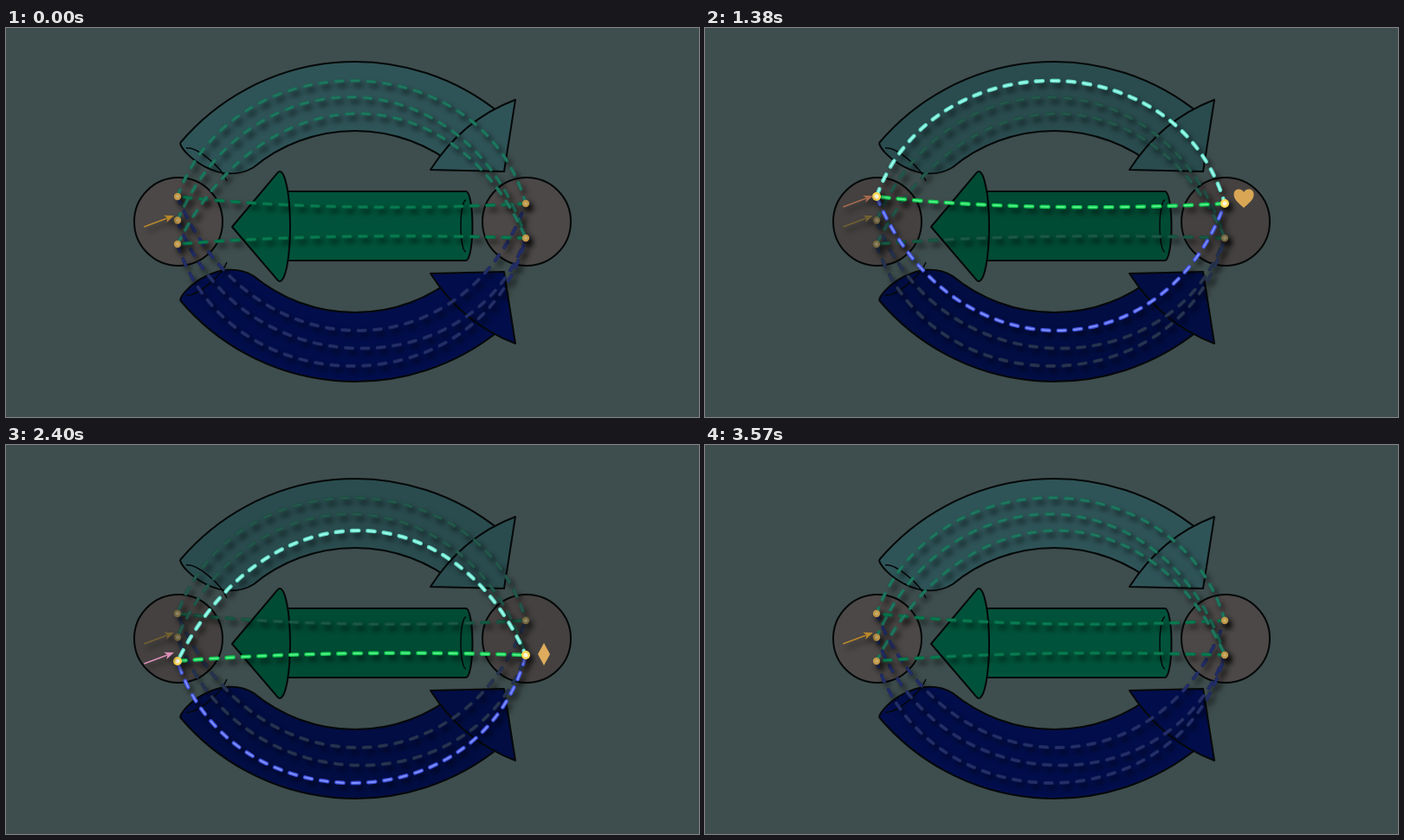
Recreate the animation shown at these times as an HTML page with a canvas. Size 800 by 450 pixels, loop 3600 ms.

```html
<!DOCTYPE html>
<html lang="en">
<head>
<meta charset="utf-8">
<title>Dashed flow diagram</title>
<style>
  html, body { margin: 0; width: 100%; height: 100%; overflow: hidden; background: #3e4d4d; }
  canvas { display: block; width: 800px; height: 450px; }
</style>
</head>
<body>
<canvas id="stage" width="800" height="450"></canvas>
<script>
const ctx = document.getElementById('stage').getContext('2d');
const LOOP = 3600, STEP = 30, FLOW = 450;
const DASH = 8.2, PERIOD = 18.4;
const LEFT = 198, RIGHT = 600;
const TAU = Math.PI * 2;
const INK = '#050808', WHITE = [255, 255, 255], BLACK = [0, 0, 0], MURK = [42, 58, 58];

const hues = {
  teal:  { tube: [47, 84, 88], rest: [31, 122, 98],  lit: [118, 255, 230] },
  green: { tube: [0, 83, 58],  rest: [8, 126, 82],   lit: [18, 235, 92] },
  blue:  { tube: [2, 14, 76],  rest: [36, 48, 108],  lit: [76, 98, 255] },
  dot:   { rest: [190, 150, 70], lit: [255, 218, 84] }
};

const leftY = row => 195 + 27.5 * row;
const rightY = row => row ? 243 : 203;
const clamp = v => Math.max(0, Math.min(1, v));
const mix = (a, b, k) => a.map((v, i) => v + (b[i] - v) * k);
const rgb = (c, alpha = 1) => `rgba(${c.map(Math.round).join(',')},${alpha})`;

// A cubic between the dots of a row whose middle lies at height `peak`.
function link(hue, row, peak, reach) {
  const y1 = leftY(row), y2 = rightY(row), bend = (8 * peak - y1 - y2) / 6;
  const points = [[LEFT, y1], [LEFT + reach, bend], [RIGHT - 0.85 * reach, bend], [RIGHT, y2]];
  return { hue, row, points: hue === 'green' ? points.reverse() : points };
}

const links = [];
for (let row = 0; row < 3; row++) {
  links.push(link('teal', row, 61 + 19 * row, 64 + 18 * row));
  links.push(link('blue', row, 350 + 20.5 * row, 84 - 12 * row));
  if (row !== 1) links.push(link('green', row, 207 + 17 * row, 132));
}

function fadeAt(t, start) {
  return Math.min(clamp((t - start) / 240), clamp((start + 1770 - t) / 270));
}

function shape(fill, trace, width = 2) {
  ctx.beginPath();
  trace();
  if (fill) {
    ctx.fillStyle = fill;
    ctx.fill();
  }
  ctx.strokeStyle = INK;
  ctx.lineWidth = width;
  ctx.stroke();
}

function disc(x, y, r, fill) {
  ctx.fillStyle = fill;
  ctx.beginPath();
  ctx.arc(x, y, r, 0, TAU);
  ctx.fill();
}

function curvedTube(fill) {
  const cx = 403, cy = 303, outer = 264, inner = 184, end = -0.88;
  shape(fill, () => {
    ctx.arc(cx, cy, outer, -2.442, end);
    ctx.arc(cx, cy, inner, end, -2.442 + 0.18, true);
    ctx.bezierCurveTo(248, 184, 203, 146, 201, 133);
  });
  shape(null, () => {
    ctx.moveTo(208, 139);
    ctx.bezierCurveTo(220, 137, 248, 160, 255, 177);
  }, 1.5);
  shape(fill, () => {
    ctx.moveTo(490, 164);
    ctx.quadraticCurveTo(527, 106, 588, 83);
    ctx.lineTo(575, 166);
    ctx.closePath();
  });
}

function straightTube(fill) {
  const cy = 229, tip = 261, base = 316, rim = 12, half = Math.PI / 2;
  const tangent = Math.acos(-rim / (base - tip));
  shape(fill, () => {
    ctx.moveTo(base, cy - 40);
    ctx.ellipse(531, cy, 7.5, 40, 0, -half, half);
    ctx.lineTo(base, cy + 40);
  });
  shape(null, () => ctx.ellipse(531, cy, 6, 30, 0, half, 3 * half), 1.5);
  shape(fill, () => {
    ctx.moveTo(tip, cy + 1);
    ctx.ellipse(base, cy + 0.5, rim, 63.5, 0, -tangent, tangent);
    ctx.closePath();
  });
}

function withShadow(paint) {
  ctx.save();
  ctx.shadowColor = 'rgba(0,0,0,0.65)';
  ctx.shadowBlur = 6;
  ctx.shadowOffsetX = 4;
  ctx.shadowOffsetY = 5;
  paint();
  ctx.restore();
}

function tone(hue, lit, busy) {
  return mix(mix(hue.rest, MURK, busy / 2), hue.lit, lit);
}

function drawLink({ hue, row, points }, t, fades, busy) {
  const lit = fades[row], color = tone(hues[hue], lit, busy);
  const [start, ...rest] = points;
  const stroke = (style, width) => {
    ctx.strokeStyle = style;
    ctx.lineWidth = width;
    ctx.stroke();
  };
  ctx.save();
  ctx.beginPath();
  ctx.moveTo(...start);
  ctx.bezierCurveTo(...rest.flat());
  ctx.lineCap = 'round';
  ctx.setLineDash([DASH, PERIOD - DASH]);
  ctx.lineDashOffset = -PERIOD * (t % FLOW) / FLOW;
  withShadow(() => stroke(rgb(mix(color, BLACK, 0.15)), 4 + 0.6 * lit));
  stroke(rgb(mix(color, WHITE, 0.3 * lit)), 1.8);
  ctx.restore();
}

function drawDot(x, y, lit, busy) {
  const color = tone(hues.dot, lit, busy), r = 4.2 + 0.8 * lit;
  withShadow(() => disc(x, y, r, rgb(color)));
  disc(x, y, r / 2, rgb(mix(color, WHITE, 0.2 + 0.6 * lit)));
}

function arrow(row, color, alpha) {
  if (!alpha) return;
  ctx.save();
  ctx.globalAlpha = alpha;
  ctx.translate(194, 194 + 23 * row);
  ctx.rotate(-0.36);
  ctx.strokeStyle = ctx.fillStyle = rgb(color);
  ctx.lineWidth = 1.6;
  withShadow(() => {
    ctx.beginPath();
    ctx.moveTo(-37, 0);
    ctx.lineTo(-7, 0);
    ctx.stroke();
    ctx.beginPath();
    ctx.moveTo(0, 0);
    ctx.lineTo(-11, -4.5);
    ctx.lineTo(-8, 0);
    ctx.lineTo(-11, 4.5);
    ctx.fill();
  });
  ctx.restore();
}

function symbol(x, y, color, alpha, trace) {
  ctx.save();
  ctx.globalAlpha = alpha;
  ctx.translate(x, y);
  ctx.fillStyle = color;
  ctx.beginPath();
  trace();
  ctx.fill();
  ctx.restore();
}

function heart() {
  for (const side of [-1, 1]) {
    ctx.moveTo(0, 11);
    ctx.bezierCurveTo(side * 5, 6, side * 12, 2, side * 11.5, -5);
    ctx.bezierCurveTo(side * 11, -12, side * 2, -12, 0, -7);
  }
}

function diamond() {
  ctx.moveTo(0, -13);
  ctx.lineTo(7, 0);
  ctx.lineTo(0, 13);
  ctx.lineTo(-7, 0);
}

function draw(now) {
  const t = Math.floor((now % LOOP) / STEP) * STEP;
  const fades = [fadeAt(t, 0), 0, fadeAt(t, 1800)];
  const busy = Math.max(...fades);
  const shade = color => rgb(mix(color, BLACK, 0.1 * busy));

  ctx.lineJoin = 'round';
  ctx.fillStyle = '#3e4d4d';
  ctx.fillRect(0, 0, 800, 450);
  for (const x of [199, 601]) shape(shade([75, 72, 71]), () => ctx.arc(x, 224, 51, 0, TAU));

  curvedTube(shade(hues.teal.tube));
  ctx.save();
  ctx.translate(0, 448);
  ctx.scale(1, -1);
  curvedTube(shade(hues.blue.tube));
  ctx.restore();
  straightTube(shade(hues.green.tube));

  // Lit links go on top of the dimmed ones.
  [...links].sort((a, b) => fades[a.row] - fades[b.row])
    .forEach(item => drawLink(item, t, fades, busy));
  fades.forEach((lit, row) => {
    drawDot(LEFT, leftY(row), lit, busy);
    if (row !== 1) drawDot(RIGHT, rightY(row), lit, busy);
  });

  arrow(0, [168, 106, 78], fades[0]);
  arrow(1, mix([186, 136, 42], MURK, busy / 2), 1);
  arrow(2, [220, 145, 185], fades[2]);
  symbol(622, 197, '#d8a655', fades[0], heart);
  symbol(621, 242, '#deac5c', fades[2], diamond);
}

function loop() {
  draw(performance.now());
  requestAnimationFrame(loop);
}
loop();
</script>
</body>
</html>
```
